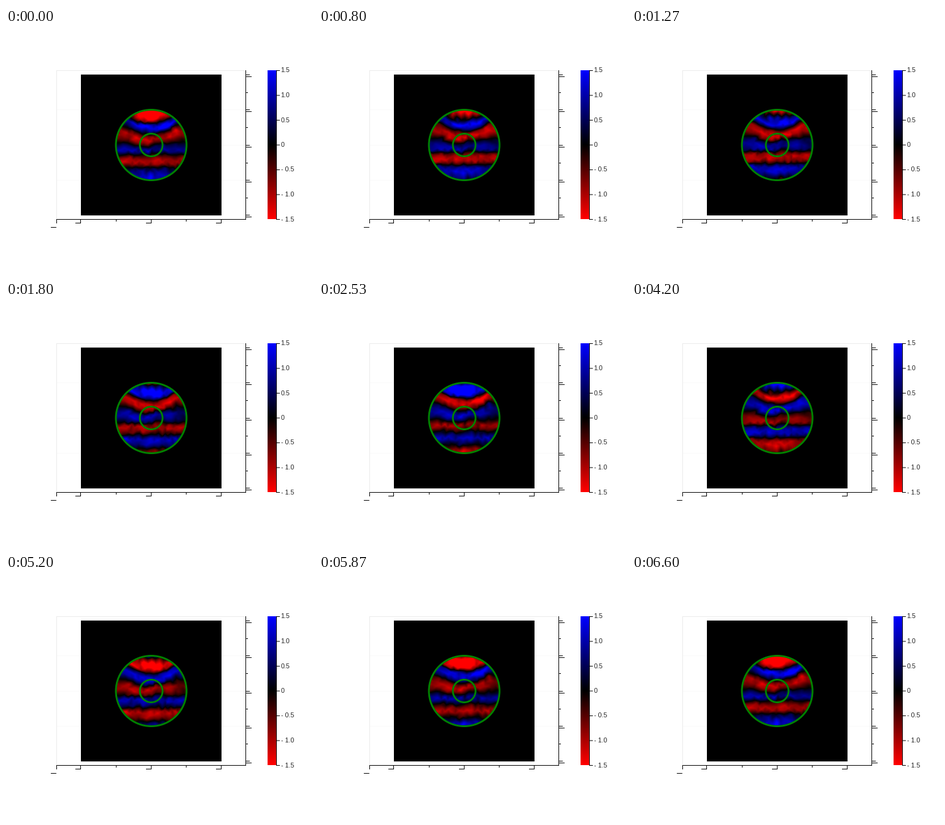
These frames come from a looping animation (500 by 400 pixels, 6.67 s). A matplotlib script:

```python
import matplotlib.pyplot as plt
import matplotlib.tri as mtri
import numpy as np
from matplotlib.animation import FuncAnimation
from matplotlib.colors import LinearSegmentedColormap
from matplotlib.patches import Circle, Rectangle

W, H, DPI = 500, 400, 100
FRAMES, LOOP = 100, 6670
CX, CY, R_OUT, R_IN = 236.5, 191, 57.5, 18.5
PX = 72 / DPI

rng = np.random.default_rng(12)
CMAP = LinearSegmentedColormap.from_list("wave", ["red", "black", "blue"], N=512)

# Wave phase, and the heights where it is reached on the axis and at the sides
PHASE = [2.7, 3.95, 4.71, 6.1, 6.6, 7.85, 9.28, 10.99, 12.42, 14.13, 15.56,
         17.27, 18.7, 19.6]
MID = np.array([134, 150, 157, 160, 166, 173, 182, 192, 199, 206, 219,
                227, 241, 250])
SIDE = np.array([130, 138, 144, 151, 153.5, 161, 174, 187, 199, 206, 219,
                 227, 241, 250])

# Amplitude bumps: x, y, width, height
BUMPS = [
    (237, 143, 13, 1.2),
    (264, 160, 12, 0.35),
    (212, 157, 10, 0.2),
    (230, 183, 8, 0.35),
    (287, 186, 9, -0.75),
    (246, 195, 9, -0.5),
    (181, 194, 7, -0.4),
    (187, 170, 9, -0.3),
    (237, 243, 12, 0.25),
    (204, 240, 9, -0.3),
    (272, 240, 9, -0.3),
]


def amplitude(x, y):
    a = np.full_like(x, 1.1)
    for bx, by, s, h in BUMPS:
        a += h * np.exp(-((x - bx) ** 2 + (y - by) ** 2) / (2 * s * s))
    return a


def phase(x, y):
    dx = x - CX
    near = np.exp(-(dx**2 + (y - CY) ** 2) / 16**2)
    y = y + 0.4 * dx * near
    mix = np.minimum((dx / 37) ** 2, 1.2)
    return np.array([np.interp(v, MID + (SIDE - MID) * m, PHASE)
                     for v, m in zip(y, mix)])


def mesh_points(step=6.5):
    pts = [(CX, CY)]
    for k in range(1, 11):
        n = int(round(2 * np.pi * k))
        ang = 2 * np.pi * (np.arange(n) + rng.random()) / n
        r = k * step + rng.uniform(-1.5, 1.5, n)
        pts += list(zip(CX + r * np.cos(ang), CY + r * np.sin(ang)))
    return np.array(pts).T


def wave_parts(box, fine=2):
    """In-phase and quadrature fields, linear on each triangle of the mesh."""
    x, y = mesh_points()
    a = amplitude(x, y) * (1 + rng.normal(0, 0.12, x.size))
    p = phase(x, y) + rng.normal(0, 0.18, x.size)
    tri = mtri.Triangulation(x, y)
    x0, x1, y0, y1 = box
    gx, gy = np.meshgrid(np.arange(x0, x1, 1 / fine) + 0.5 / fine,
                         np.arange(y0, y1, 1 / fine) + 0.5 / fine)
    return [mtri.LinearTriInterpolator(tri, v)(gx, gy).filled(0)
            for v in (a * np.cos(p), a * np.sin(p))]


fig = plt.figure(figsize=(W / DPI, H / DPI), dpi=DPI, facecolor="white")
ax = fig.add_axes([0, 0, 1, 1])
ax.axis("off")


def line(x0, y0, x1, y1, color="black", zorder=2):
    ax.plot([x0, x1], [y0, y1], color=color, lw=PX, zorder=zorder,
            solid_capstyle="butt", snap=False)


# Pale frame and grid
line(82, 69.5, 390, 69.5, "#ebebeb")
line(82.5, 69, 82.5, 312, "#ebebeb")
for gy in (133.5, 191.5, 248.5):
    line(83, gy, 390, gy, "#fafafa", zorder=0.5)

# Bottom axis
line(82, 312.5, 391, 312.5)
line(82.5, 312, 82.5, 319)
line(73, 325.5, 82, 325.5)
for tx in (121.5, 236.5, 350.5):
    line(tx, 312, tx, 319)
    line(tx - 8.5, 318.5, tx, 318.5)
for tx in (179.5, 293.5):
    line(tx, 312, tx, 316)

# Right axis
line(390.5, 69, 390.5, 313)
for ty in (76.5, 133.5, 191.5, 248.5, 305.5):
    line(390, ty, 397, ty)
    line(391, ty + 3, 400, ty + 3)
for ty in (105.5, 162.5, 220.5, 277.5):
    line(390, ty, 394, ty)

# Colour bar
ax.imshow(np.linspace(1.5, -1.5, 243)[:, None], cmap=CMAP, vmin=-1.5, vmax=1.5,
          extent=(425.5, 440.5, 312, 69), aspect="auto", interpolation="nearest")
line(440.5, 69, 440.5, 313)
for k, label in enumerate(["1.5", "1.0", "0.5", "0", "- 0.5", "- 1.0", "- 1.5"]):
    ty = 69.5 + 40.5 * k
    line(440, ty, 446, ty)
    ax.text(447.5, ty - 1, label, family="Liberation Sans", size=10.6 * PX,
            color="#222222", va="center_baseline")

# Field
ax.add_patch(Rectangle((122, 76), 229, 230, fc="black", lw=0))
BOX = (178, 296, 132, 250)
re, im = wave_parts(BOX)
field = ax.imshow(re, cmap=CMAP, vmin=-1.5, vmax=1.5, zorder=3, aspect="auto",
                  extent=(BOX[0], BOX[1], BOX[3], BOX[2]))
field.set_clip_path(Circle((CX, CY), R_OUT, transform=ax.transData))
for r in (R_OUT, R_IN):
    ax.add_patch(Circle((CX, CY), r, fill=False, ec="green", lw=3 * PX, zorder=4))

ax.set_xlim(0, W)
ax.set_ylim(H, 0)


def update(i):
    t = 2 * np.pi * i / (FRAMES - 1)
    field.set_data(re * np.cos(t) - im * np.sin(t))
    return [field]


anim = FuncAnimation(fig, update, frames=FRAMES, interval=LOOP / FRAMES,
                     repeat=True, repeat_delay=0)
plt.show()
```
